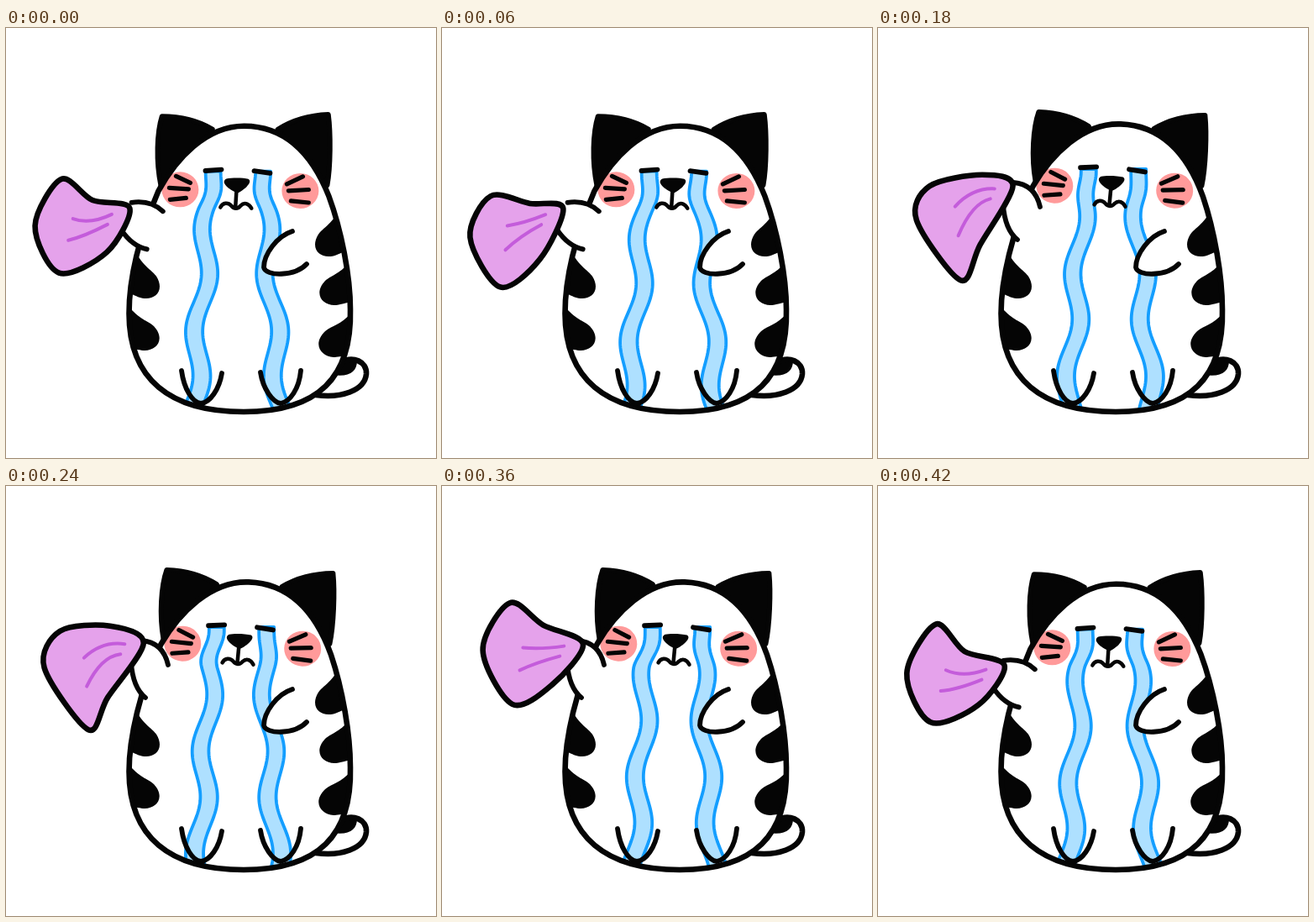
Recreate the animation shown at these times as an HTML page with a canvas. Size 512 px wide and 512 px high, loop 480 ms.

```html
<!DOCTYPE html>
<html lang="en">
<head>
<meta charset="utf-8">
<title>Crying cat</title>
<style>
html, body { margin: 0; width: 100%; height: 100%; overflow: hidden; background: #fff; }
canvas { display: block; width: 100%; height: 100%; }
</style>
</head>
<body>
<canvas id="stage" width="512" height="512"></canvas>
<script>
const ctx = document.getElementById('stage').getContext('2d');
const STEP = 60, STEPS = 8, TAU = Math.PI * 2;
const INK = '#050505', PINK = '#ff9a9a', OUTLINE = 6.6;
const TEAR = '#aee0ff', TEAR_EDGE = '#149eff', WAVELENGTH = 122;
const CLOTH = '#e5a2eb', FOLD = '#c45cdb';
const PIVOT = [360, 285], TURN = 0.035;

const EARS = new Path2D(
  'M245 121C228 111 206 106 185 106C179 125 178 160 184 188Z' +
  'M323 121C340 110 360 104 383 103C386 125 386 165 382 187Z');
const TAIL = new Path2D('M369 437C399 441 427 432 429 412C430 397 413 390 399 398');
const TAIL_TIP = new Path2D('M391 394L418 396C418 409 409 416 389 413Z');
const STRIPE = new Path2D('M-26 -46C-12 -20 2 -19 11 -11C25 4 15 18 0 18C-8 18 -16 14 -40 10Z');
const FEET = new Path2D(
  'M209 408C212 430 222 446 232 447C243 446 254 430 257 411' +
  'M303 410C306 430 318 446 327 447C338 445 349 430 351 408');
const PAW = new Path2D('M341 242C322 248 307 270 307 285C309 296 344 296 358 281');
const WHISKERS = new Path2D(
  'M202 177L219 185M194 191L217 192.5M195 205L214 203' +
  'M334 186L353 177M336 194L360 192.5M339 206L360 208');
const EYES = new Path2D('M237 170.5L256 169M295 170.5L314 173');
const NOSE = new Path2D('M262 180C268 178.5 282 178.5 288 180C294 183 284 193 275 197C265 193 254 184 262 180Z');
const MOUTH = new Path2D(
  'M274 195L273 212M255 214C258 208 264 208 268 212C271 216 276 216 279 212C284 207 289 210 292 215');

const mix = (a, b, k) => a.map((v, i) => v + (b[i] - v) * k);
const add = (a, b) => a.map((v, i) => v + b[i]);
const scale = (a, x, y = x) => [a[0] * x, a[1] * y];
const clamp = v => Math.max(0, Math.min(1, v));
const swell = (step, peak) => (1 + Math.cos((step - peak) / STEPS * TAU)) / 2;

function stroke(path, width, color = INK) {
  ctx.lineWidth = width;
  ctx.strokeStyle = color;
  ctx.stroke(path);
}

function fill(path, color) {
  ctx.fillStyle = color;
  ctx.fill(path);
}

function tilted(angle, draw) {
  ctx.save();
  ctx.translate(...PIVOT);
  ctx.rotate(angle);
  ctx.translate(-PIVOT[0], -PIVOT[1]);
  draw();
  ctx.restore();
}

function bodyPath(angle) {
  const c = Math.cos(angle), s = Math.sin(angle);
  const p = (x, y) => {
    const dx = x - PIVOT[0], dy = y - PIVOT[1];
    return [PIVOT[0] + dx * c - dy * s, PIVOT[1] + dx * s + dy * c];
  };
  const path = new Path2D();
  path.moveTo(...p(283, 117));
  path.bezierCurveTo(...p(332, 117), ...p(364, 150), ...p(384, 200));
  path.bezierCurveTo(...p(399, 240), 410, 295, 410, 335);
  path.bezierCurveTo(412, 416, 372, 457, 283, 457);
  path.bezierCurveTo(195, 457, 146.5, 418, 146.5, 340);
  path.bezierCurveTo(146.5, 300, ...p(158, 250), ...p(181, 195));
  path.bezierCurveTo(...p(202, 156), ...p(238, 117), ...p(283, 117));
  path.closePath();
  return path;
}

// Closed Catmull-Rom curve.
function smoothLoop(pts) {
  const n = pts.length;
  const at = i => pts[(i + n) % n];
  const path = new Path2D();
  path.moveTo(...at(0));
  for (let i = 0; i < n; i++) {
    const [a, b, c, d] = [at(i - 1), at(i), at(i + 1), at(i + 2)];
    path.bezierCurveTo(
      b[0] + (c[0] - a[0]) / 6.5, b[1] + (c[1] - a[1]) / 6.5,
      c[0] - (d[0] - b[0]) / 6.5, c[1] - (d[1] - b[1]) / 6.5, ...c);
  }
  path.closePath();
  return path;
}

function arc(a, ctrl, b) {
  const path = new Path2D();
  path.moveTo(...a);
  path.quadraticCurveTo(...ctrl, ...b);
  return path;
}

function drawStripe(x, y, side, turn = 0, size = 1) {
  ctx.save();
  ctx.translate(x, y);
  ctx.scale(side * size, size);
  ctx.rotate(turn);
  fill(STRIPE, INK);
  ctx.restore();
}

function drawStripes() {
  drawStripe(166, 304, 1, 0.2);
  drawStripe(165, 366, 1);
  drawStripe(385, 254, -1, 0.2);
  drawStripe(391, 312, -1);
  drawStripe(391, 373, -1, -0.05, 1.05);
}

// A wave runs down each stream; the streams spread less while the head is up.
function drawTear(side, step, tilt) {
  const sway = swell(step, 5);
  const crest = 293 + WAVELENGTH * step / STEPS + 23 * sway;
  const slope = 0.081 - 0.027 * sway;
  const eye = 275.8 + side * 29.7 + 4.7 * tilt;
  const left = [], right = [];
  for (let y = 171 - 3 * tilt; y <= 464; y += 3) {
    const d = y - 172;
    const wave = 6.7 * Math.cos((y - crest) / WAVELENGTH * TAU);
    const x = 275 + side * (30 + slope * d - wave) + 1.5 * tilt;
    const k = clamp(d / 45);
    const mid = eye + (x - eye) * k * k * (3 - 2 * k);
    const half = 9 + 0.006 * d;
    left.push([mid - half, y]);
    right.unshift([mid + half, y]);
  }
  const path = new Path2D();
  [...left, ...right].forEach(p => path.lineTo(...p));
  path.closePath();
  fill(path, TEAR);
  stroke(path, 3.8, TEAR_EDGE);
}

function drawCheeks() {
  ctx.fillStyle = PINK;
  for (const [x, y] of [[207, 193], [350, 194]]) {
    ctx.beginPath();
    ctx.ellipse(x, y, 22, 21, 0, 0, TAU);
    ctx.fill();
  }
  stroke(WHISKERS, 5.2);
}

function drawArm(tilt) {
  const joint = (down, up) => mix(down, up, tilt);
  const top = [joint([148, 211], [161, 184]), joint([170, 207], [187, 186]), joint([186, 219], [193, 213])];
  const low = [joint([136, 245], [149, 210]), joint([150, 262], [151, 240]), joint([168, 265], [166, 252])];
  const skin = arc(...top);
  skin.lineTo(...low[2]);
  skin.quadraticCurveTo(...low[1], ...low[0]);
  fill(skin, '#fff');
  stroke(arc(...top), 5.8);
  stroke(arc(...low), 5.8);
}

// The cloth hangs from the paw; its corners droop and swing once per loop.
function drawCloth(step, tilt) {
  const droop = swell(step, 2.5);
  const swing = Math.sin((step - 2.5) / STEPS * TAU);
  const hand = add(mix([146, 216], [164, 189], tilt), [3.5 - 8 * droop + 2 * swing, -2 * swing]);
  const corner = (rest, fall, drift) => add(rest, add(scale(fall, droop), scale(drift, swing)));
  const at = p => add(hand, p);

  const top = corner([-48, -20], [12, 10], [0, -8]);
  const tip = corner([-84, -51], [-13, 53], [-7, 0]);
  const side = corner([-118, 7], [5, 36], [-4, -3]);
  const bottom = corner([-87, 68], [24, 44], [5, 5]);
  const under = corner([-34, 47], [-2, 23], [-8, 2]);
  const cloth = smoothLoop([[0, 0], top, tip, side, bottom, under].map(at));
  fill(cloth, CLOTH);

  const curl = 8 - 20 * droop - 10 * swing;
  const end = add(scale(side, 0.19), [0, curl * 0.3]);
  const low = add(scale(side, 0.35), scale(bottom, 0.4));
  const upperFold = [scale(side, 0.6), add(scale(side, 0.42), [0, curl]), end];
  const lowerFold = [low, add(scale(low, 0.75, 0.6), [0, curl]), add(end, [-5, 12])];
  for (const fold of [upperFold, lowerFold]) stroke(arc(...fold.map(at)), 4, FOLD);
  stroke(cloth, OUTLINE);
}

function draw(step) {
  const tilt = step >= 3 && step <= 6 ? 1 : 0.12;
  const angle = TURN * tilt;
  const body = bodyPath(angle);
  ctx.fillStyle = '#fff';
  ctx.fillRect(0, 0, 512, 512);
  ctx.lineCap = ctx.lineJoin = 'round';

  fill(TAIL_TIP, INK);
  stroke(TAIL, OUTLINE);
  tilted(angle, () => {
    fill(EARS, INK);
    stroke(EARS, 6);
  });

  fill(body, '#fff');
  ctx.save();
  ctx.clip(body);
  drawStripes();
  tilted(angle, drawCheeks);
  drawTear(-1, step, tilt);
  drawTear(1, step, tilt);
  ctx.restore();
  stroke(body, OUTLINE);

  tilted(angle, () => {
    stroke(EYES, 5.8);
    fill(NOSE, INK);
    stroke(MOUTH, 4.5);
  });
  stroke(FEET, 5.8);
  fill(PAW, '#fff');
  stroke(PAW, 5.8);
  drawArm(tilt);
  drawCloth(step, tilt);
}

const start = performance.now();
function tick() {
  draw(Math.floor((performance.now() - start) / STEP) % STEPS);
  requestAnimationFrame(tick);
}
tick();
</script>
</body>
</html>
```
